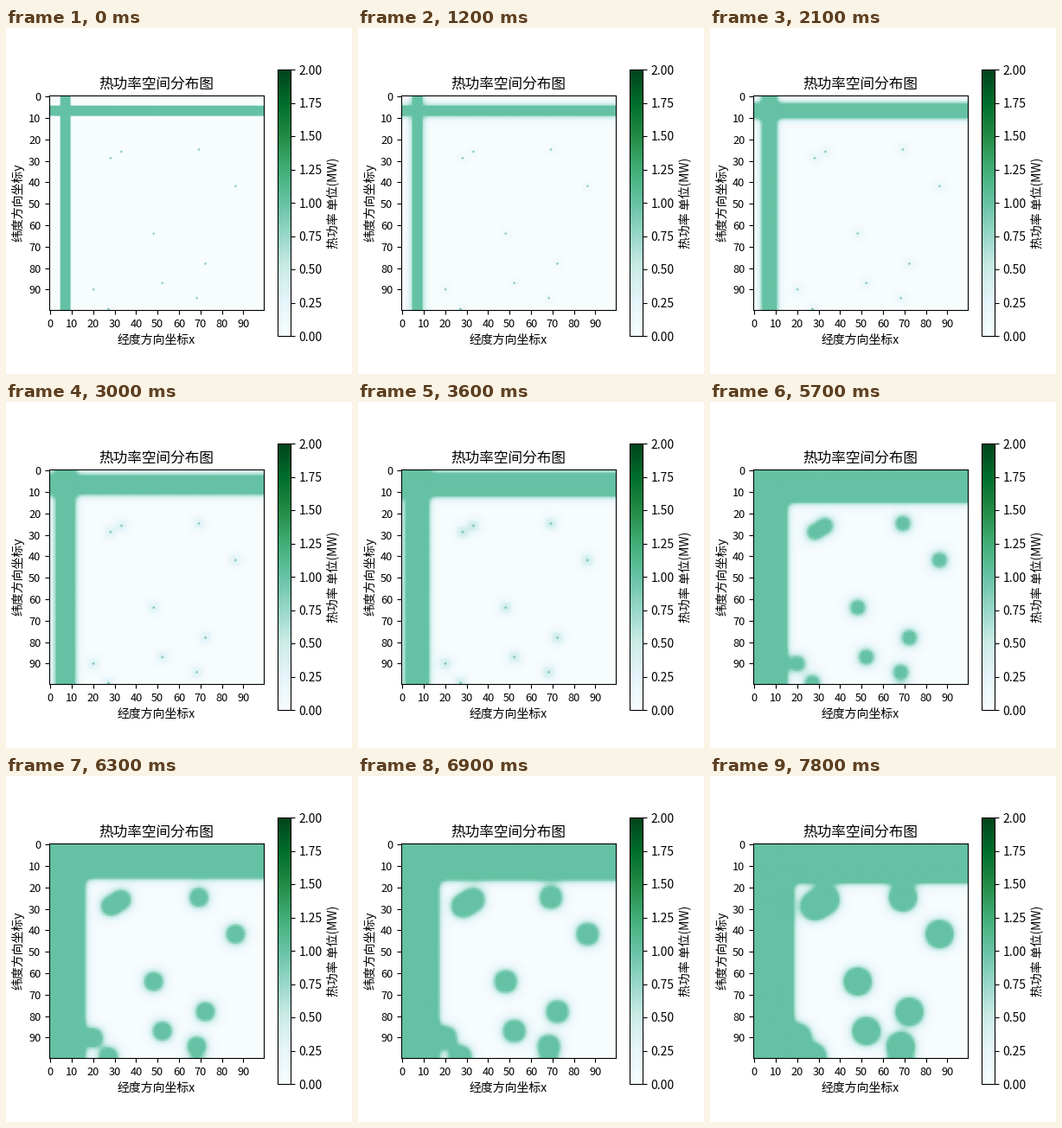
Animation, 400 px wide and 400 px high, one loop 8000 ms. Source, as a matplotlib script:

```python
import numpy as np
import matplotlib.pyplot as plt
from matplotlib.animation import FuncAnimation

plt.rcParams["font.family"] = ["Noto Sans CJK JP"]

SIZE, DPI = 400, 100
GRID, REACH, RATE = 100, 2, 0.27
STEPS, TICKS_PER_STEP = 27, 3
SEEDS = [(28, 29), (33, 26), (69, 25), (86, 42), (48, 64),
         (72, 78), (52, 87), (20, 90), (68, 94), (27, 99)]


def window_mean(field):
    """Mean over the square neighbourhood, mirrored at the borders."""
    padded = np.pad(field, REACH, mode="reflect")
    span = range(2 * REACH + 1)
    return np.mean([padded[dy:dy + GRID, dx:dx + GRID]
                    for dy in span for dx in span], axis=0)


def simulate():
    power = np.zeros((GRID, GRID))
    power[5:10, :] = power[:, 5:10] = 1
    for x, y in SEEDS:
        power[y, x] = 1
    states = [power]
    for _ in range(STEPS - 1):
        power = np.minimum(1, power + RATE * window_mean(power))
        states.append(power)
    return states


def label(x, y, text, size=10, rotation=0):
    """Centred text with its baseline at pixel (x, y) from the top left."""
    fig.text(x / SIZE, 1 - y / SIZE, text, size=size, rotation=rotation,
             ha="center", va="baseline", rotation_mode="anchor")


states = simulate()
fig, ax = plt.subplots(figsize=(SIZE / DPI, SIZE / DPI), dpi=DPI)
image = ax.imshow(states[0], cmap="BuGn", vmin=0, vmax=2)
bar = fig.colorbar(image, ax=ax)
bar.set_ticks(np.linspace(0, 2, 9))
bar.ax.tick_params(labelsize=10)
ax.set_xticks(range(0, GRID, 10))
ax.set_yticks(range(0, GRID, 10))
ax.tick_params(labelsize=9.2)

label(174, 69.7, "热功率空间分布图", size=12)
label(174, 365.3, "经度方向坐标x")
label(18.6, 202, "纬度方向坐标y", rotation=90)
label(382.3, 202, "热功率 单位(MW)", rotation=90)


def update(frame):
    image.set_data(states[frame // TICKS_PER_STEP])
    return [image]


anim = FuncAnimation(fig, update, frames=80, interval=100,
                     repeat=True, repeat_delay=0)
plt.show()
```
